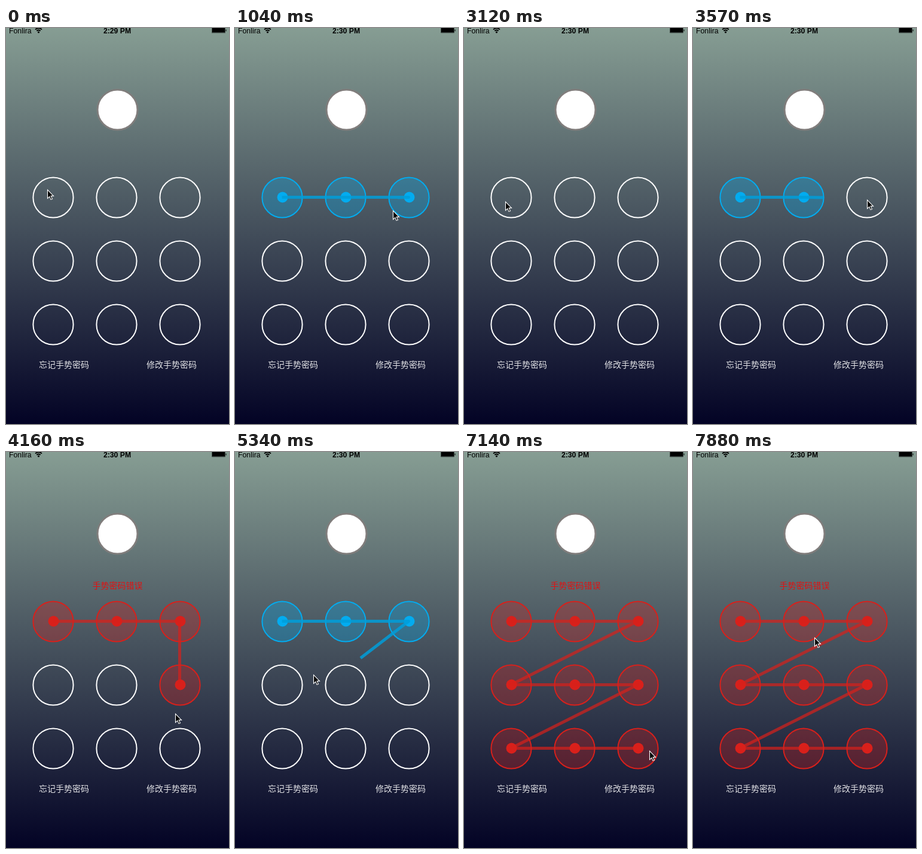
Recreate the animation shown at these times as an HTML page with a canvas. Size 373 by 661 pixels, loop 8000 ms.

```html
<!DOCTYPE html>
<html lang="zh">
<meta charset="utf-8">
<title>手势密码</title>
<style>
  html, body { margin: 0; overflow: hidden; }
  canvas { display: block; }
</style>
<canvas id="stage" width="373" height="661"></canvas>
<script>
const ctx = document.getElementById('stage').getContext('2d');
const LOOP = 8000, STEP = 148.6, LAST_STEP = 53;
const BLUE = { solid: 'rgb(2,172,240)', fill: 'rgba(2,172,240,.3)', line: 'rgba(0,158,218,.85)' };
const RED = { solid: 'rgb(217,32,27)', fill: 'rgba(217,32,27,.3)', line: 'rgba(217,32,27,.7)' };

const point = (x, y) => ({ x, y });
const cells = Array.from({ length: 9 }, (_, i) =>
  point(79 + 106 * (i % 3), 283 + 106 * Math.floor(i / 3)));

// Each leg runs at even speed through its points; the pointer rests in between
const home = point(69, 289);
const legs = [
  { from: 0, to: 1, via: [point(69, 269), point(67, 270)] },
  { from: 2, to: 9, via: [...cells.slice(0, 3), point(182, 370)] },
  { from: 14, to: 18, via: [home] },
  { from: 21, to: 26, via: [...cells.slice(0, 3), cells[5], point(283, 436)] },
  { from: 28, to: 32, via: [cells[0]] },
  { from: 32, to: 35, via: [cells[2], point(210, 344)] },
  { from: 35, to: 42, via: cells.slice(3, 7) },
  { from: 42, to: 43, via: [point(88, 495)] },
  { from: 43, to: 45, via: [point(202, 502), point(310, 498)] },
  { from: 51, to: 53, via: [point(203, 309)] }
];
legs.forEach((leg, i) => {
  leg.points = i ? [legs[i - 1].points.at(-1), ...leg.via] : leg.via;
});

const strokes = [
  { start: 3, release: 14, clear: 21, ok: true },
  { start: 22, release: 27, clear: 33, ok: false },
  { start: 33, release: 48, clear: 54, ok: false }
];

const distance = (a, b) => Math.hypot(a.x - b.x, a.y - b.y);

function pointer(step) {
  const { from, to, points } = legs.findLast(leg => leg.from <= step);
  const lengths = points.slice(1).map((p, i) => distance(p, points[i]));
  const total = lengths.reduce((sum, d) => sum + d, 0);
  let left = total * Math.min(1, (step - from) / (to - from));
  let i = 0;
  while (i < lengths.length - 1 && left > lengths[i]) left -= lengths[i++];
  const a = points[i], b = points[i + 1], f = left / lengths[i];
  return point(a.x + (b.x - a.x) * f, a.y + (b.y - a.y) * f);
}

// Cells touched so far; the touch trails the pointer by one step
function touched(stroke, step) {
  const hits = new Set(), end = Math.min(step, stroke.release) - 1;
  for (let s = stroke.start - 1; s <= end + 1e-6; s += 0.05) {
    const p = pointer(s), hit = cells.find(c => distance(c, p) < 32);
    if (hit) hits.add(hit);
  }
  return [...hits];
}

function disc({ x, y }, r, fill, stroke, width) {
  ctx.beginPath();
  ctx.arc(x, y, r, 0, 2 * Math.PI);
  if (fill) { ctx.fillStyle = fill; ctx.fill(); }
  if (stroke) { ctx.strokeStyle = stroke; ctx.lineWidth = width; ctx.stroke(); }
}

function label(text, x, y, color, font, align = 'center') {
  ctx.font = font;
  ctx.fillStyle = color;
  ctx.textAlign = align;
  ctx.fillText(text, x, y);
}

const hanzi = (text, x, y, color = 'rgba(255,255,255,.87)') =>
  label(text, x, y, color, '300 14px "Noto Sans CJK SC", "Noto Sans CJK", sans-serif');

function background() {
  const g = ctx.createLinearGradient(0, 0, 0, 661);
  g.addColorStop(0, 'rgb(134,157,147)');
  g.addColorStop(1, 'rgb(3,3,37)');
  ctx.fillStyle = g;
  ctx.fillRect(0, 0, 373, 661);
}

function statusBar(clock) {
  label('Fonlira', 5, 9, '#000', '12.3px "Liberation Sans", sans-serif', 'left');
  label(clock, 186, 9, '#000', 'bold 12.2px "Liberation Sans", sans-serif');
  ctx.strokeStyle = '#000';
  ctx.lineWidth = 1.8;
  for (const r of [4.5, 7.7]) {
    ctx.beginPath();
    ctx.arc(54.5, 8, r, -Math.PI * 0.75, -Math.PI * 0.25);
    ctx.stroke();
  }
  disc(point(54.5, 7), 1.6, '#000');
  ctx.fillRect(345, 0, 21, 7.5);
  ctx.fillRect(367.5, 2.5, 1, 3);
  ctx.strokeStyle = 'rgba(0,0,0,.5)';
  ctx.lineWidth = 1;
  ctx.strokeRect(344.5, -0.5, 22, 8.5);
}

function pattern(step) {
  const stroke = strokes.find(s => step >= s.start && step < s.clear);
  const hits = stroke ? touched(stroke, step) : [];
  const released = stroke && step >= stroke.release;
  const color = released && !stroke.ok ? RED : BLUE;

  for (const c of cells) {
    const on = hits.includes(c);
    disc(c, 33.6, on && color.fill, on ? color.solid : '#fff', 2);
    if (on) disc(point(c.x + 0.5, c.y - 0.5), 9, color.solid);
  }
  if (!hits.length) return;

  ctx.beginPath();
  for (const c of hits) ctx.lineTo(c.x - 0.5, c.y - 0.5);
  if (!released) {
    const tip = pointer(step - 1);
    ctx.lineTo(tip.x, tip.y);
  }
  ctx.strokeStyle = color.line;
  ctx.lineWidth = 5;
  ctx.lineJoin = 'round';
  ctx.stroke();

  if (released) {
    if (stroke.ok) hanzi('输入正确', 186.5, 228);
    else hanzi('手势密码错误', 186.5, 228, '#e01212');
  }
}

const arrow = new Path2D('M0 0V14.5L3.3 11.4L5.5 16.4L7.9 15.4L5.7 10.4H10Z');

function cursor({ x, y }) {
  ctx.save();
  ctx.translate(Math.round(x) + 0.5, Math.round(y) + 1);
  ctx.lineJoin = 'miter';
  ctx.lineWidth = 1.1;
  ctx.fillStyle = '#000';
  ctx.strokeStyle = '#fff';
  ctx.fill(arrow);
  ctx.stroke(arrow);
  ctx.restore();
}

function draw(now) {
  const step = Math.min(LAST_STEP, Math.floor((now % LOOP) / STEP + 0.07));
  background();
  statusBar(step < 4 ? '2:29 PM' : '2:30 PM');
  disc(point(186.5, 136.5), 33.5, '#fff', '#807d7c', 3);
  hanzi('忘记手势密码', 97, 567);
  hanzi('修改手势密码', 277, 567);
  pattern(step);
  cursor(pointer(step));
  requestAnimationFrame(() => draw(performance.now()));
}
draw(0);
</script>
</html>
```
